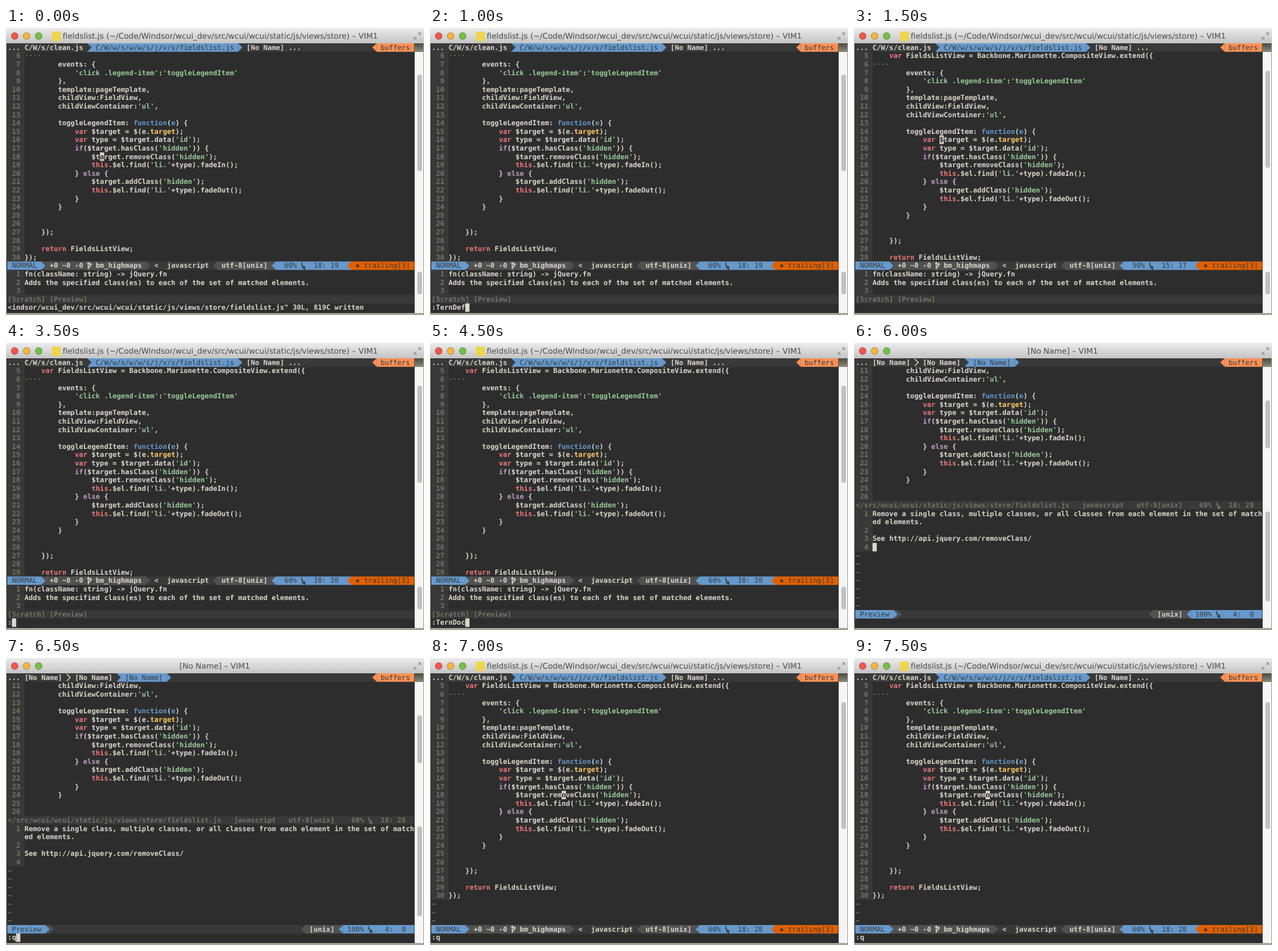
These frames come from a looping animation (627 px wide and 431 px high, 8 s). An HTML page:

```html
<!DOCTYPE html>
<html lang="en">
<head>
<meta charset="utf-8">
<title>Editor session</title>
<style>
  html, body { margin: 0; width: 100%; height: 100%; overflow: hidden; background: #a5a396; }
  svg { display: block; }
  text { font: bold 10.44px "DejaVu Sans Mono", "Liberation Mono", monospace; text-rendering: geometricPrecision; }
  text.thin { font-weight: normal; }
  text.title { font: 11.72px "DejaVu Sans", sans-serif; fill: #4a4a4a; }
</style>
</head>
<body>
<svg width="627" height="431" viewBox="0 0 627 431">
  <defs>
    <linearGradient id="bar" x2="0" y2="1">
      <stop offset="0" stop-color="#ececec"/><stop offset="1" stop-color="#c4c4c4"/>
    </linearGradient>
    <linearGradient id="desk" x2="0" y2="1">
      <stop offset="0" stop-color="#4c4a40"/><stop offset="1" stop-color="#8c8a7c"/>
    </linearGradient>
  </defs>
  <rect width="627" height="431" fill="#a5a396"/>
  <rect width="627" height="23" fill="url(#bar)"/>
  <rect x="1" y="23" width="612" height="405" fill="#2d2d2d"/>
  <rect x="613" y="23" width="13" height="13" fill="url(#desk)"/>
  <rect x="613" y="36" width="13" height="392" fill="#f5f5f5"/>
  <g stroke-opacity=".35" stroke="#000" stroke-width=".8">
    <circle cx="13" cy="12" r="5.2" fill="#f0564d"/>
    <circle cx="31" cy="12" r="5.2" fill="#f5b63c"/>
    <circle cx="49" cy="12" r="5.2" fill="#74bf48"/>
  </g>
  <path d="M618 7h4v4zM612 13v4h4zM621 8l-3 3M613 16l3-3" fill="#a0a0a0" stroke="#a0a0a0"/>
  <g id="screen"></g>
</svg>
<script>
const CW = 6.285, RH = 12.6, COLS = 97;
const BG = '#2d2d2d', GUTTER = '#393939', GREY = '#515151', DIM = '#747369', FG = '#dad7cf',
      BLUE = '#6699cc', RED = '#ec7a74', GREEN = '#99cc99', PURPLE = '#c09cc0',
      YELLOW = '#ffcc66', ORANGE = '#f99157', WARN = '#e06000';

const source = {
  5: "    var FieldsListView = Backbone.Marionette.CompositeView.extend({",
  7: "        events: {",
  8: "            'click .legend-item':'toggleLegendItem'",
  9: "        },",
  10: "        template:pageTemplate,",
  11: "        childView:FieldView,",
  12: "        childViewContainer:'ul',",
  14: "        toggleLegendItem: function(e) {",
  15: "            var $target = $(e.target);",
  16: "            var type = $target.data('id');",
  17: "            if($target.hasClass('hidden')) {",
  18: "                $target.removeClass('hidden');",
  19: "                this.$el.find('li.'+type).fadeIn();",
  20: "            } else {",
  21: "                $target.addClass('hidden');",
  22: "                this.$el.find('li.'+type).fadeOut();",
  23: "            }",
  24: "        }",
  27: "    });",
  29: "    return FieldsListView;",
  30: "});"
};
const shortDoc = [
  [1, 'fn(className: string) -> jQuery.fn'],
  [2, 'Adds the specified class(es) to each of the set of matched elements.'],
  [3, '']
];
const longDoc = [
  [1, 'Remove a single class, multiple classes, or all classes from each element in the set of match'],
  ['', 'ed elements.'],
  [2, ''],
  [3, 'See http://api.jquery.com/removeClass/'],
  [4, '']
];

// Each step lasts 500 ms and changes only what it names.
const steps = [
  { split: 26, top: 6, pos: [18, 19], thumbs: [[70, 145], [366, 34]], typing: false, inDoc: false,
    cmd: '<indsor/wcui_dev/src/wcui/wcui/static/js/views/store/fieldslist.js" 30L, 819C written' },
  { cmd: ':Tern', typing: true },
  { cmd: ':TernDef' },
  { cmd: '', typing: false, top: 5, pos: [15, 17], thumbs: [[64, 146], [366, 34]] },
  {},
  { pos: [18, 17] },
  { pos: [18, 25] },
  { pos: [18, 28], cmd: ':', typing: true },
  { cmd: ':TernD' },
  { cmd: ':TernDoc' },
  { cmd: '', typing: false, split: 17, top: 11, thumbs: [[86, 72], [253, 135]] },
  {},
  { inDoc: true },
  { cmd: ':q', typing: true },
  { typing: false, inDoc: false, split: 30, top: 5, thumbs: [[66, 191]] },
  {}
];
const states = [];
steps.reduce((prev, step) => (states.push({ ...prev, ...step }), states.at(-1)), {});

let out = '';
const X = c => 2.6 + c * CW, Y = r => 23 + r * RH;
const esc = s => s.replace(/&/g, '&amp;').replace(/</g, '&lt;');

function box(c, r, w, fill, h = 1) {
  const x = c ? X(c) : 2;
  out += `<rect x="${x}" y="${Y(r)}" width="${X(c + w) - x + .1}" height="${h * RH + .1}" fill="${fill}"/>`;
}
// Words are placed one by one to keep them on the character grid.
function put(c, r, s, fill = FG, cls = '') {
  for (const m of s.matchAll(/\S+/g))
    out += `<text x="${X(c + m.index)}" y="${Y(r) + 9.7}" fill="${fill}" class="${cls}">${esc(m[0])}</text>`;
}
// Dark lettering on a coloured segment.
const label = (c, r, s) => put(c, r, s, GUTTER, 'thin');

function path(c, r, d, attrs) {
  out += `<path transform="translate(${X(c)} ${Y(r)})" d="${d}" ${attrs}/>`;
}
const right = (c, r, fill) => path(c, r, `M-.1 0L${CW} ${RH / 2}L-.1 ${RH}z`, `fill="${fill}"`);
const left = (c, r, fill) => path(c, r, `M${CW + .1} 0L0 ${RH / 2}L${CW + .1} ${RH}z`, `fill="${fill}"`);
const branch = (c, r) => path(c, r, 'M1.5 1v11M1.5 9Q5 8 5 4.5M0 3.5l1.5-2 1.5 2M3.6 5l1.4-2 1.4 2',
  `fill="none" stroke="${FG}" stroke-width="1.5"`);
const lineMark = (c, r, color) => path(c, r, 'M1 1.5v4.5h2.2M2.6 11.5v-4.5l3 4.5v-4.5',
  `fill="none" stroke="${color}" stroke-width="1.4"`);

function number(r, n) {
  box(0, r, 4, GUTTER);
  put(0, r, String(n).padStart(3), DIM);
}
function code(r, s) {
  const token = /('[^']*')|\b(var|this|return)\b|\b(if|else)\b|\b(function|e(?=\)))\b|\b(target)(?=\))/g;
  const colors = [GREEN, RED, PURPLE, BLUE, YELLOW];
  let at = 0;
  for (const m of s.matchAll(token)) {
    put(4 + at, r, s.slice(at, m.index));
    put(4 + m.index, r, m[0], colors[m.slice(1).findIndex(Boolean)]);
    at = m.index + m[0].length;
  }
  put(4 + at, r, s.slice(at));
}
function cursor(c, r, ch = '') {
  box(c, r, 1, FG);
  put(c, r, ch, BG);
}

function tabs(inDoc) {
  box(0, 0, COLS, GUTTER);
  put(0, 0, '...');
  const [start, name] = inDoc ? [26, '[No Name]'] : [19, 'C/W/w/s/w/w/s/j/v/s/fieldslist.js'];
  const end = start + 3 + name.length;
  box(start, 0, end - start, BLUE);
  right(start, 0, GUTTER);
  label(start + 2, 0, name);
  right(end, 0, BLUE);
  if (inDoc) {
    put(4, 0, '[No Name]   [No Name]');
    path(14, 0, `M.5 1L${CW - .5} ${RH / 2}L.5 ${RH - 1}`, `fill="none" stroke="${FG}" stroke-width="1.3"`);
  } else {
    put(4, 0, 'C/W/s/clean.js');
    put(57, 0, '[No Name] ...');
  }
  left(87, 0, ORANGE);
  box(88, 0, 9, ORANGE);
  label(89, 0, 'buffers');
}

function codeStatus(r, [line, col], active) {
  const percent = Math.round(line / 30 * 100) + '%', place = `${line}: ${col}`;
  box(0, r, COLS, GUTTER);
  if (!active) {
    put(0, r, '</src/wcui/wcui/static/js/views/store/fieldslist.js   javascript   utf-8[unix]', DIM);
    put(82, r, percent, DIM);
    lineMark(86, r, DIM);
    put(89, r, place, DIM);
    return;
  }
  box(8, r, 25, GREY);
  box(0, r, 8, BLUE);
  right(8, r, BLUE);
  right(33, r, GREY);
  label(1, r, 'NORMAL');
  put(10, r, '+0 ~0 -0');
  branch(19, r);
  put(21, r, 'bm_highmaps');
  put(35, r, '<  javascript');
  left(49, r, GREY);
  box(50, r, 14, GREY);
  put(51, r, 'utf-8[unix]');
  left(63, r, BLUE);
  box(64, r, 18, BLUE);
  label(66, r, percent);
  lineMark(70, r, GUTTER);
  label(73, r, place);
  left(81, r, WARN);
  box(82, r, 15, WARN);
  label(83, r, '✹ trailing[3]');
}

function docStatus(r, split, active) {
  box(0, r, COLS, GUTTER);
  if (split === 26) return put(0, r, '[Scratch] [Preview]', DIM);
  if (active) {
    box(9, r, 1, GREY);
    box(0, r, 9, BLUE);
    right(10, r, GREY);
    right(9, r, BLUE);
    left(70, r, GREY);
    box(71, r, 9, GREY);
    left(79, r, BLUE);
    box(80, r, 17, BLUE);
  }
  const ink = active ? GUTTER : DIM, cls = active ? 'thin' : '';
  put(1, r, active ? 'Preview' : '[Scratch]', ink, cls);
  put(72, r, '[unix]', active ? FG : DIM);
  put(81, r, '100%', ink, cls);
  lineMark(86, r, ink);
  put(90, r, '4:  0', ink, cls);
}

function draw(s) {
  out = '';
  if (s.inDoc) {
    out += '<text class="title" x="313" y="16.3" text-anchor="middle">[No Name] – VIM1</text>';
  } else {
    out += '<rect x="69" y="5.5" width="13" height="14" fill="#f0d64a"/>' +
      '<text class="title" x="85" y="16.3">fieldslist.js (~/Code/Windsor/wcui_dev/src/wcui/wcui/static/js/views/store) – VIM1</text>';
  }
  for (const [y, h] of s.thumbs)
    out += `<rect x="617" y="${y}" width="7" height="${h}" rx="3.5" fill="#c1c1c1"/>`;
  tabs(s.inDoc);

  for (let r = 1; r < s.split; r++) {
    const n = s.top + r - 1;
    if (n > 30) { put(0, r, '~', DIM); continue; }
    number(r, n);
    if (n === 6) put(4, r, '····', DIM);
    code(r, source[n] || '');
  }
  codeStatus(s.split, s.pos, !s.inDoc);

  if (s.split < 30) {
    const doc = s.split === 26 ? shortDoc : longDoc;
    for (let r = s.split + 1, i = 0; r < 30; r++, i++) {
      if (!doc[i]) { put(0, r, '~', DIM); continue; }
      number(r, doc[i][0]);
      put(4, r, doc[i][1]);
    }
    docStatus(30, s.split, s.inDoc);
  }

  put(0, 31, s.cmd);
  const [line, col] = s.pos;
  if (s.typing) cursor(s.cmd.length, 31);
  else if (s.inDoc) cursor(4, 22);
  else cursor(col + 3, line - s.top + 1, source[line][col - 1]);
  document.getElementById('screen').innerHTML = out;
}

let shown = -1;
function tick() {
  const i = Math.floor(performance.now() % 8000 / 500);
  if (i !== shown) draw(states[shown = i]);
  requestAnimationFrame(tick);
}
tick();
</script>
</body>
</html>
```
